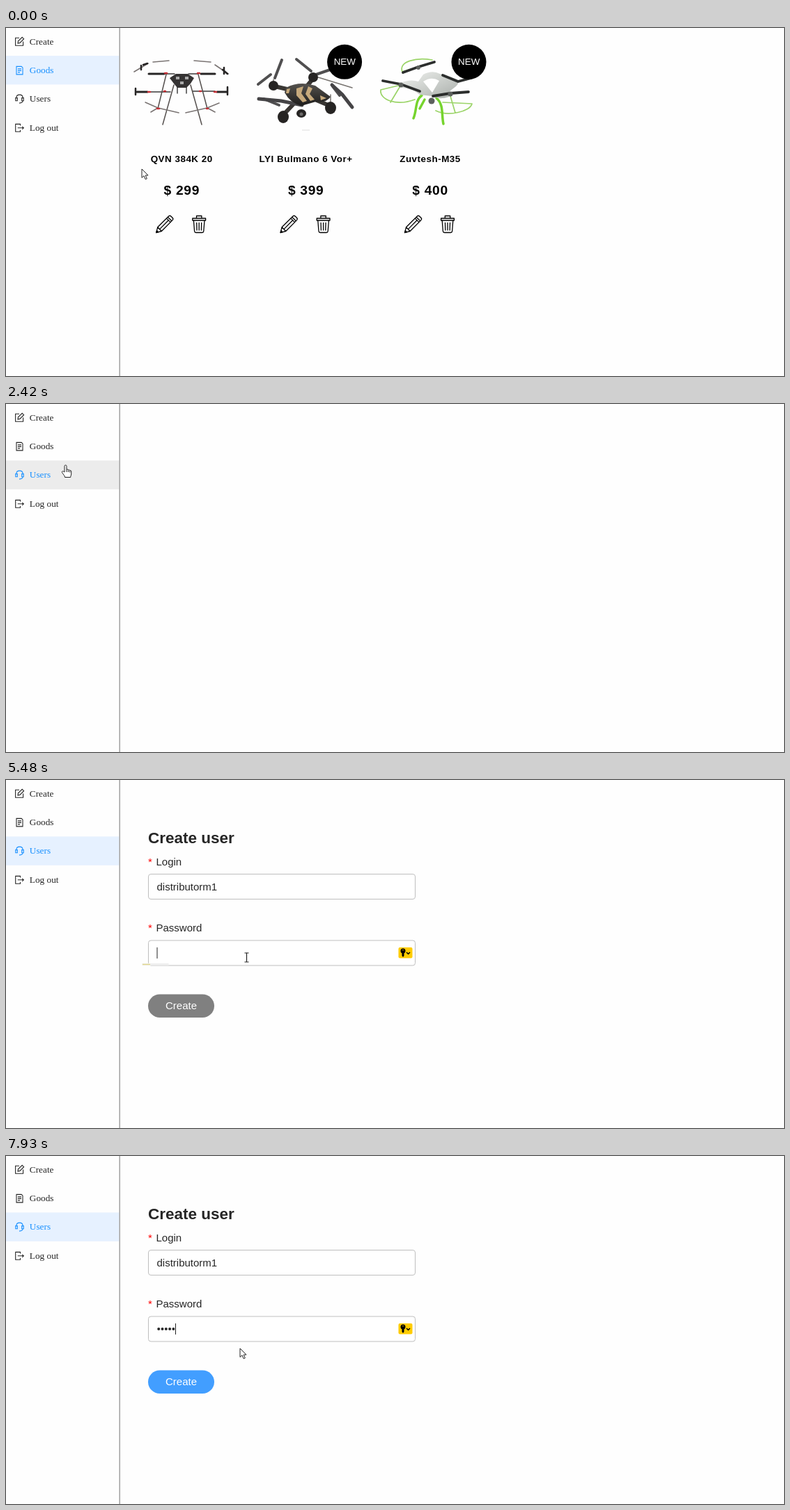
An HTML page for the animation above (8000 ms loop, 1117 by 501 pixels).

```html
<!DOCTYPE html>
<html lang="en">
<head>
<meta charset="utf-8">
<title>Shop admin</title>
<style>
  html, body { margin: 0; width: 100%; height: 100%; overflow: hidden; background: #fefefe; }
  svg.stage { display: block; width: 100%; height: 100%; }
  text { font-family: "Liberation Sans", Arial, sans-serif; fill: #262626; white-space: pre; }
  .menu text { font: 13.3px "Liberation Serif", "Times New Roman", serif; fill: currentColor; }
  .icon { fill: none; stroke: currentColor; stroke-width: 1.1; }
  .name { font-size: 13.4px; font-weight: 700; letter-spacing: .52px; text-anchor: middle; fill: #000; }
  .price { font-size: 19.2px; font-weight: 700; letter-spacing: .7px; text-anchor: middle; fill: #000; }
  .new { font-size: 13.4px; text-anchor: middle; fill: #fff; }
  .label { font-size: 15px; }
  .title { font-size: 22.5px; font-weight: 700; }
  .star, .error text { fill: #f00; }
  .error text { font-size: 13.25px; }
  .field { fill: #fff; stroke: #bfbfbf; }
  .tool { fill: none; stroke: #000; stroke-width: 1.3; stroke-linejoin: round; stroke-linecap: round; }
  .line { fill: none; stroke-linecap: round; }
</style>
</head>
<body>
<svg class="stage" viewBox="0 0 1117 501">
  <defs>
    <g id="pencil" class="tool">
      <path d="M.7 25.300 2.700 17.500 18.500 1.700q1.700-1.500 3.300 0l2.300 2.300q1.500 1.600 0 3.300L8.400 23.200zM2.700 17.500l5.700 5.700M15.500 4.700l5.600 5.600M17.300 2.900l5.600 5.600M5.600 20.300 18.300 7.500"/>
      <path d="M.7 25.300 1.600 22.300l2 2z" fill="#000"/>
    </g>
    <g id="trash" class="tool">
      <path d="M.8 4.500h18.800v3H.8zM6.500 4V1h7.400V4M2.400 7.800 3.600 23q.2 2 2 2h9.200q1.800 0 2-2L18 7.800M6.700 11l.3 10.500M10.200 11v10.500M13.700 11l-.3 10.500"/>
    </g>
    <linearGradient id="shell" x1="0" y1="0" x2="1" y2="1">
      <stop stop-color="#f0f2ef"/><stop offset="1" stop-color="#a9aeaa"/>
    </linearGradient>
    <linearGradient id="coal" x1="0" y1="0" x2="0" y2="1">
      <stop stop-color="#55524e"/><stop offset="1" stop-color="#1d1c1b"/>
    </linearGradient>
  </defs>

  <g id="goods">
    <g class="line">
      <path d="M228 66H242M262 66H276M206 92H236M268 91H300" stroke="#3a3838" stroke-width="1.500"/>
      <path d="M205 66H227M280 66H300M188 92H203M303 92H317" stroke="#262424" stroke-width="3"/>
      <path d="M230 67 218 116M276 67 289 116M241 82 225 139M265 82 281 139" stroke="#55504e" stroke-width="1.500"/>
      <path d="M246 84V94M259 84V94" stroke="#444" stroke-width="1.500"/>
      <path d="M184 63 204 51M211 49 234 47M270 47 294 49M300 53 319 66M200 107 218 115 248 122M258 122 289 115 306 108M218 115 208 121M289 115 300 121" stroke="#7a7473" stroke-width="1.600"/>
      <path d="M194 54V60M313 57V66M186 87V96M318 85V96M197 53 203 51M311 60 318 66" stroke="#262424" stroke-width="2.500"/>
      <path d="M228 65H231M275 65H278M204 92H207M299 92H302M227 91H229M278 91H280M217 116H220M288 116H290" stroke="#c62f35" stroke-width="2.500"/>
    </g>
    <path d="M235 72 244 66H261L270 72 265 80 259 86H246L241 80z" fill="#353333"/>
    <path d="M244 70h5v4h-5zM257 70h5v4h-5zM250 77h5v4h-5z" fill="#aaa"/>

    <g class="line">
      <path d="M386 84 412 90M430 86 440 74M401 122 416 106M446 104 465 112" stroke="#393633" stroke-width="6"/>
      <path d="M362 81 380 67M386 72 396 46M417 45 438 62M445 67 474 57M370 102 392 111M469 84 479 97" stroke="#504f50" stroke-width="4"/>
      <path d="M363 102 395 105 425 111M468 82 483 96 497 114" stroke="#454446" stroke-width="5"/>
      <path d="M445 70 497 86M384 74V83M466 96V110" stroke="#77736f" stroke-width="1.500"/>
    </g>
    <path d="M402 86Q421 76 444 83L466 99Q460 108 445 106L424 112Q408 108 400 93z" fill="url(#coal)"/>
    <path d="M417 87 427 84 424 94 432 105 426 107 417 97zM434 84 440 87 436 95 443 103 437 105 430 95zM403 88 408 87 406 94 402 94zM451 97 460 101 452 104z" fill="#c6a97c"/>
    <g fill="#262423"><ellipse cx="384" cy="83" rx="7" ry="7"/><ellipse cx="441" cy="71" rx="7" ry="7"/><ellipse cx="398" cy="128" rx="8" ry="9"/><ellipse cx="466" cy="115" rx="8" ry="9"/><ellipse cx="424" cy="123" rx="7" ry="6"/></g>
    <circle cx="424" cy="124" r="2.500" fill="#6b6968"/>
    <path d="M425 147H436" stroke="#ddd"/>

    <g class="line" stroke="#9bd468">
      <path d="M538 89C536 103 560 113 587 103M538 89 567 82M552 107 567 82M569 63C563 48 589 42 612 46M569 63 592 56M617 119C635 128 667 120 669 109M627 107 669 109M645 122 638 98" stroke-width="1.700"/>
      <path d="M597 97C587 104 590 119 585 130M618 101C629 110 625 126 628 138M601 103 594 116" stroke="#76d42d" stroke-width="3.500"/>
    </g>
    <path d="M566 79Q581 73 592 77L599 67Q612 60 623 66L645 73Q653 78 646 84L637 91 636 99Q622 104 611 98L594 96Q584 87 568 86z" fill="url(#shell)"/>
    <path d="M599 77Q611 69 622 76L612 93z" fill="#fff"/>
    <path class="line" d="M541 76 567 81 594 91M570 64 592 56 615 49M613 98 638 94 664 92M627 68 649 77 668 72" stroke="#2c2e2d" stroke-width="3.800"/>
    <g fill="#5c605d"><circle cx="567" cy="82" r="3.500"/><circle cx="592" cy="57" r="3"/><circle cx="638" cy="95" r="3.500"/><circle cx="611" cy="105" r="4.500"/></g>
  </g>

  <g id="form">
    <text class="title" x="204" y="91">Create user</text>
    <text class="label" x="204" y="123"><tspan class="star">*</tspan><tspan x="215.500">Login</tspan></text>
    <rect class="field" x="204.500" y="135.500" width="383" height="36" rx="3.500"/>
    <text class="label" x="204" y="218"><tspan class="star">*</tspan><tspan x="215.500">Password</tspan></text>
    <rect class="field" x="204.500" y="231" width="383" height="36" rx="3.500"/>
    <text class="label" id="login" x="216.500" y="158.500"></text>
    <g id="dots" fill="#262626"></g>
    <g id="key">
      <rect x="563.500" y="241" width="20" height="15.500" rx="2" fill="#fc0"/>
      <circle cx="570" cy="246" r="3.500"/><path d="M568.500 248h3v5l-1.500 2-1.500-2z"/>
      <circle cx="570" cy="244.700" r=".8" fill="#fc0"/>
      <path d="m575 248 2.500 2.500L580 248" fill="none" stroke="#000" stroke-width="1.500"/>
    </g>
    <rect id="button" x="204" y="308.500" width="95" height="33.500" rx="16.750"/>
    <text class="label" x="229" y="330" style="fill:#fff">Create</text>
    <g class="error" id="error">
      <text x="212.500" y="288">* The password must be at least 3 characters and no more than</text>
      <text x="212.500" y="303">16</text>
    </g>
    <g id="panel">
      <rect id="sheet" x="196" y="264.500" fill="#fdfdfd" stroke="#eee"/>
      <path d="M196 265.500h11" stroke="#e2d88e" stroke-width="1.500"/>
      <path d="M207 265.500h26" stroke="#eee" stroke-width="3"/>
    </g>
    <path id="caret" stroke="#222"/>
  </g>

  <g class="menu" id="menu"></g>
  <path d="M163.200 0V501" stroke="#999" stroke-width="1.400"/>

  <g id="cursor" stroke="#222">
    <path id="arrow" d="M0 0V12.500L3 9.800 5.200 14.800 7.300 13.900 5.200 9.100H9z" fill="#fff"/>
    <path id="hand" d="M-2 10V1.500a1.500 1.500 0 0 1 3 0V6.500c1-.8 2-.5 2.400.5 1-.6 2-.2 2.300.8 1.200-.5 2 0 2 1.200V13c0 1.500-1 2.500-1 4.500H-1.500C-1.500 15-3.500 14-5.500 10.500c-.6-1.200.6-2.400 2-1.400zM1 6.500V10M3.400 7.300V10M5.700 8V10.500" fill="#fff"/>
    <path id="beam" d="M-3-6.500H-.5L0-6 .5-6.500H3M0-6V6M-3 6.500H-.5L0 6 .5 6.500H3" fill="none" stroke-width="1.200"/>
  </g>
</svg>
<script>
const LOOP = 8000;
const $ = id => document.getElementById(id);
const show = (id, on) => { $(id).style.display = on ? '' : 'none'; };
// Last row whose start time has passed.
const stepAt = (rows, t) => rows.findLast(row => row[0] <= t);

const products = [
  ['QVN 384K 20', 299, false],
  ['LYI Bulmano 6 Vor+', 399, true],
  ['Zuvtesh-M35', 400, true],
];
$('goods').innerHTML += products.map(([name, price, isNew], i) => `
  <g transform="translate(${i * 178.4} 0)">
    <text class="name" x="252.2" y="193">${name}</text>
    <text class="price" x="252.3" y="239.5">$ ${price}</text>
    <use href="#pencil" x="215" y="269.3"/><use href="#trash" x="267" y="269.5"/>
    ${isNew ? '<circle cx="307.7" cy="48.8" r="25"/><text class="new" x="307.9" y="53">NEW</text>' : ''}
  </g>`).join('');

const items = [
  ['Create', 'M19 14.2H13.6V25.3H24.6V19.500M17 22 17.500 18.800 23.200 13.300 25.600 15.700 20 21.400z'],
  ['Goods', 'M15 14H22.200L24 15.800V25.500H15zM17 17.500H22M17 20H22M17 22.500H20'],
  ['Users', 'M14.8 18C14.800 11.800 24.200 11.800 24.200 18M15.500 17.800H13.800V22H16.300V17.800zM23.500 17.800H25.200V22H22.700V17.800zM24.200 22Q24 25 19 25.300'],
  ['Log out', 'M20.500 16.300V14.200H13.700V25H20.500V22.900M16.800 19.600H25.300M23.300 17.600 25.300 19.600 23.300 21.600'],
];
$('menu').innerHTML = items.map(([label, icon], i) => `
  <g transform="translate(0 ${i * 41.4})">
    <rect y="-1.4" width="162.5" height="41.4"/>
    <path class="icon" d="${icon}"/><text x="33.8" y="23.5">${label}</text>
  </g>`).join('');
const rows = [...$('menu').children];

// start, x, y, shape, hovered menu row
const pointer = [
  [0, 195, 203, 'arrow'], [150, 184, 188, 'arrow'], [290, 166, 166, 'arrow'],
  [430, 140, 140, 'hand', 3], [570, 121, 123, 'hand', 3], [710, 109, 113, 'hand', 2],
  [850, 104, 110, 'hand', 2], [1130, 104, 98, 'hand', 2], [1270, 104, 74, 'hand', 1],
  [1410, 105, 46, 'hand', 1], [1560, 104, 24, 'hand', 0], [1700, 101, 26, 'hand', 0],
  [1840, 98, 38, 'hand', 0], [1990, 92, 66, 'hand', 1], [2140, 86, 88, 'hand', 2],
  [2980, 85, 87, 'hand', 2], [3120, 115, 112, 'hand', 2], [3260, 168, 168, 'arrow'],
  [3410, 201, 233, 'arrow'], [3560, 218, 220, 'arrow'], [3690, 243, 199, 'arrow'],
  [3820, 272, 177, 'arrow'], [3950, 302, 163, 'beam'], [4080, 325, 155, 'beam'],
  [4210, 337, 152, 'beam'], [5200, 341, 178, 'arrow'], [5340, 344, 232, 'beam'],
  [5480, 345.5, 255.5, 'beam'], [5790, 342, 262, 'beam'], [5940, 337, 273, 'arrow'],
  [6090, 336, 277, 'arrow'],
];
const typed = [[0, 0], [4630, 2], [4770, 5], [4910, 8], [5050, 11], [5200, 13]];
const secret = [[0, 0], [6520, 1], [7070, 2], [7220, 3], [7500, 4], [7930, 5]];
const fade = [[0, 0], [2700, .3], [2840, .65], [2980, .88], [3120, .97], [3260, 1]];
const sheet = [[0, 0, 0], [5480, 37, 2], [5630, 380, 46], [5790, 394, 47], [6660, 0, 0]];
const login = 'distributorm1';

function drawMenu(t, hovered) {
  const selected = t < 2420 ? 1 : t >= 3260 ? 2 : -1;
  rows.forEach((row, i) => {
    row.style.color = i === selected || i === hovered ? '#1890ff' : '#262626';
    row.firstElementChild.setAttribute('fill',
      i === selected ? '#e6f1ff' : i === hovered ? '#ececec' : 'none');
  });
}

function drawForm(t) {
  const chars = stepAt(typed, t)[1];
  const dots = stepAt(secret, t)[1];
  const [, width, height] = stepAt(sheet, t);
  $('form').style.opacity = stepAt(fade, t)[1];
  $('login').textContent = login.slice(0, chars);
  $('dots').innerHTML = Array.from({ length: dots },
    (_, i) => `<circle cx="${219.2 + i * 5.3}" cy="249" r="2"/>`).join('');

  const inPassword = t >= 5480;
  const caretX = inPassword ? 217 + dots * 5.3 : 217 + $('login').getComputedTextLength();
  $('caret').setAttribute('d', `M${caretX} ${inPassword ? 241 : 145.5}v16`);
  show('caret', t >= 4480);
  show('key', inPassword);
  show('panel', width > 0);
  $('sheet').setAttribute('width', width);
  $('sheet').setAttribute('height', height);
  show('error', t >= 6800 && dots < 3);
  $('button').setAttribute('fill', dots < 3 ? '#808080' : '#429eff');
}

function draw(now) {
  const t = now % LOOP;
  const [, x, y, shape, hovered] = stepAt(pointer, t);
  show('goods', t < 2420);
  drawMenu(t, hovered);
  drawForm(t);
  ['arrow', 'hand', 'beam'].forEach(id => show(id, id === shape));
  $('cursor').setAttribute('transform', `translate(${x} ${y})`);
}

const start = performance.now();
function tick() {
  draw(performance.now() - start);
  requestAnimationFrame(tick);
}
tick();
</script>
</body>
</html>
```
